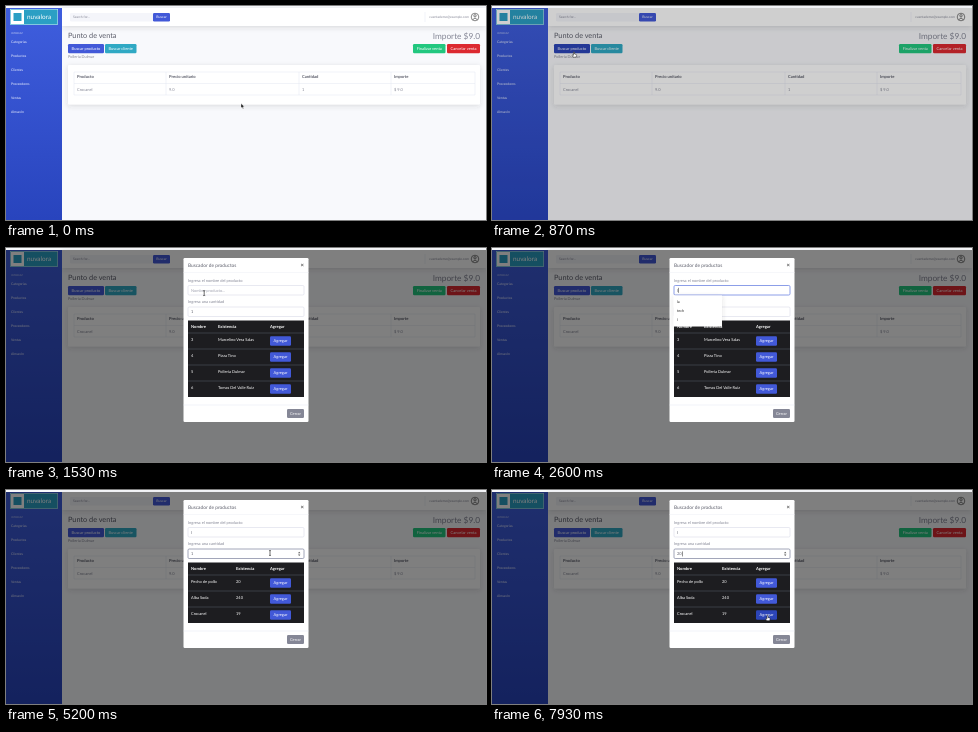
An HTML page that plays this animation: 480 by 214 pixels, repeating every 8 s.

```html
<!DOCTYPE html>
<html lang="es">
<head>
<meta charset="utf-8">
<title>Punto de venta</title>
<style>
  html, body { margin: 0; width: 100%; height: 100%; overflow: hidden; background: #f8f9fc; }
  svg { display: block; width: 100vw; height: 100vh; }
  text { font-family: Lato, "Open Sans", sans-serif; text-rendering: geometricPrecision; white-space: pre; }
</style>
</head>
<body>
<svg id="stage" viewBox="0 0 480 214">
  <defs>
    <linearGradient id="side" x2="0" y2="1">
      <stop stop-color="#3f5ede"/><stop offset="1" stop-color="#2844bd"/>
    </linearGradient>
    <filter id="soft" x="-10%" y="-30%" width="120%" height="170%">
      <feDropShadow dx="0" dy="1.5" stdDeviation="2.5" flood-color="#3a3b45" flood-opacity=".16"/>
    </filter>
  </defs>
</svg>
<script>
const LOOP = 8000;
const BLUE = '#4259d8', DARK_BLUE = '#2c45b8', GRAY = '#858796', INK = '#5a5c69', LINE = '#e3e6f0';
let parent = document.getElementById('stage');

function add(tag, attrs) {
  const el = document.createElementNS('http://www.w3.org/2000/svg', tag);
  for (const k in attrs) el.setAttribute(k, attrs[k]);
  return parent.appendChild(el);
}
function group(build, attrs) {
  const outer = parent, g = add('g', attrs);
  parent = g;
  build();
  parent = outer;
  return g;
}
const rect = (x, y, width, height, fill, more) => add('rect', { x, y, width, height, fill, ...more });
const line = (x1, y1, x2, y2, stroke, w = .5) => add('line', { x1, y1, x2, y2, stroke, 'stroke-width': w });
const path = (d, fill, stroke, w = .5) =>
  add('path', { d, fill, stroke, 'stroke-width': w, 'stroke-linejoin': 'round' });
function label(x, y, str, size, fill, more) {
  const el = add('text', { x, y, dy: '.33em', 'font-size': size, fill, ...more });
  el.textContent = str;
  return el;
}
const BOLD = { 'font-weight': 700 };
function button(x, y, w, h, str, fill, size = 4) {
  const box = rect(x, y, w, h, fill, { rx: 1.2 });
  label(x + w / 2, y + h / 2, str, size, '#fff', { 'text-anchor': 'middle' });
  return box;
}
const field = (y) => rect(182, y, 116, 9.5, '#fff', { rx: 1.2, stroke: '#d1d3e2', 'stroke-width': .5 });

// Page
rect(0, 0, 480, 214, '#f8f9fc');
rect(56, 2, 424, 18, '#fff', { filter: 'url(#soft)' });
rect(0, 2, 56, 212, 'url(#side)');
rect(4, 3, 48, 16, '#2b9fc4');
rect(5, 4, 13, 14, '#fff');
rect(7.5, 7, 8, 8, '#2b9fc4');
rect(4.3, 3.3, 47.4, 15.4, 'none', { stroke: '#bfe3f2', 'stroke-width': .6 });
label(21, 11, 'nuvalora', 6.4, '#fff');
label(5, 27, 'INTERFAZ', 2.5, '#a9b6ee', BOLD);
['Categorias', 'Productos', 'Clientes', 'Proveedores', 'Ventas', 'Almacén']
  .forEach((s, i) => label(5, 36.2 + i * 14, s, 3.4, '#f0f3ff'));

rect(64, 7, 83, 8.5, '#f4f5fa', { rx: 1.2 });
label(67, 11, 'Search for...', 3.3, GRAY);
button(147, 7, 17, 8.5, 'Buscar', BLUE, 3.5);
line(419, 6, 419, 16, LINE);
label(463, 11, 'cuentademo@example.com', 3.3, GRAY, { 'text-anchor': 'end' });
add('circle', { cx: 469, cy: 11, r: 3.8, fill: '#fff', stroke: '#333', 'stroke-width': .6 });
add('circle', { cx: 469, cy: 9.8, r: 1.2, fill: 'none', stroke: '#333', 'stroke-width': .6 });
path('M466.7 13.6Q469 10.6 471.3 13.6', 'none', '#333', .6);

label(62, 30, 'Punto de venta', 7.3, INK);
label(474, 30.5, 'Importe $9.0', 8.3, GRAY, { 'text-anchor': 'end' });
const searchBtn = button(62, 38, 36, 9.3, 'Buscar producto', BLUE);
button(99, 38, 31.5, 9.3, 'Buscar cliente', '#30a9c4');
button(407, 38, 32.5, 9.3, 'Finalizar venta', '#22c77f');
button(441, 38, 33, 9.3, 'Cancelar venta', '#dc2930');
label(62, 50.3, 'Pollería Dulmar', 3.9, GRAY);

rect(62, 59, 412, 39.5, '#fff', { rx: 1.2, filter: 'url(#soft)' });
[66, 77.5, 89].forEach(y => line(68, y, 469, y, LINE));
[68, 160, 293, 385, 469].forEach(x => line(x, 66, x, 89, LINE));
[['Producto', 'Crocanel', 71], ['Precio unitario', '9.0', 163], ['Cantidad', '1', 296], ['Importe', '$ 9.0', 388]]
  .forEach(([head, cell, x]) => {
    label(x, 70.8, head, 4.1, INK, BOLD);
    label(x, 83.2, cell, 4, GRAY);
  });

const backdrop = rect(0, 2, 480, 212, '#000');

// Dialog
function panel(rows, col) {
  const grow = 16 * rows.length;
  let last;
  const g = group(() => {
    rect(177.5, 10, 125, 100 + grow, '#fff', { rx: 1.2 });
    line(177.5, 24.5, 302.5, 24.5, '#eceef4');
    line(177.5, 93 + grow, 302.5, 93 + grow, LINE);
    button(281, 97 + grow, 17, 9, 'Cerrar', GRAY);
    rect(182, 72.5, 116, 12.5 + grow, '#1d1d20');
    [['Nombre', 185], ['Existencia', col], ['Agregar', 264]]
      .forEach(([s, x]) => label(x, 79, s, 4.1, '#fff', BOLD));
    rows.forEach(([a, b], i) => {
      const y = 85 + 16 * i;
      line(182, y, 298, y, '#50555c', .6);
      label(185, y + 6.5, a, 4, '#fff');
      label(col, y + 6.5, b, 4, '#fff');
      last = button(264, y + 3.3, 21, 9.4, 'Agregar', BLUE);
    });
  });
  return { g, last };
}
let clients, products, nameField, nameText, qtyField, qtyText, spinner, caret, menu;
const dialog = group(() => {
  clients = panel([['3', 'Marcelino Vera Salas'], ['4', 'Pizza Tino'], ['5', 'Pollería Dulmar'], ['6', 'Tomas Del Valle Ruiz']], 212);
  products = panel([['Pecho de pollo', '20'], ['Alba Soda', '240'], ['Crocanel', '19']], 230);
  label(182, 17, 'Buscador de productos', 4.8, INK);
  label(296.3, 16.8, '×', 6, '#555', { 'text-anchor': 'middle', ...BOLD });
  label(182, 32.3, 'Ingresa el nombre del producto', 4, GRAY);
  nameField = field(37.5);
  nameText = label(185, 42.3, '', 4, INK);
  label(182, 54, 'Ingresa una cantidad', 4, GRAY);
  qtyField = field(59);
  qtyText = label(185, 64, '', 4, INK);
  spinner = path('M292 63.2l1.2-1.5 1.2 1.5zM292 64.6l1.2 1.5 1.2-1.5z', '#555', 'none');
  caret = rect(0, 0, .5, 5, '#222');
  menu = group(() => {
    rect(181.5, 47.5, 48.5, 31, '#fff', { filter: 'url(#soft)' });
    ['la', 'tech', 'l'].forEach((s, i) => label(185, 54 + 9 * i, s, 3.7, '#222'));
  });
});

// Pointers, each with its hot spot at 0,0
const pointers = {
  arrow: group(() => path('M0 0V4.6L1.1 3.6 1.9 5.3 2.7 4.9 1.9 3.3H3.4Z', '#111', '#fff', .4)),
  hand: group(() => path('M-.5 0Q0-.6.5 0V2L2.3 2.5Q2.8 2.7 2.6 3.6L2.1 5.2H-.7L-2 3.2Q-1.6 2.5-.5 3.3Z', '#fff', '#111', .5)),
  beam: group(() => path('M-1-2.5Q0-2.5 0-2 0-2.5 1-2.5M0-2V2M-1 2.5Q0 2.5 0 2 0 2.5 1 2.5', 'none', '#111', .6))
};
const route = [
  [0, 235, 97.5], [70, 235, 97.5], [760, 82, 46], [930, 82, 46], [1070, 155, 65], [1670, 205, 42],
  [3070, 205, 42], [3870, 240, 104], [3930, 240, 104], [4130, 240.5, 106], [4200, 240.5, 106], [4730, 264, 63],
  [7470, 264, 63], [7900, 275.5, 125.5], [LOOP, 275.5, 125.5]
];

const clamp = v => Math.max(0, Math.min(1, v));
const ease = v => v * v * (3 - 2 * v);
const within = (t, a, b) => t >= a && t < b;
const show = (el, on) => el.setAttribute('visibility', on ? 'inherit' : 'hidden');
const set = (el, k, v) => el.setAttribute(k, v);

function pointerAt(t) {
  const i = route.findIndex(p => p[0] > t), [t0, x0, y0] = route[i - 1], [t1, x1, y1] = route[i];
  const k = ease((t - t0) / (t1 - t0));
  return [x0 + (x1 - x0) * k, y0 + (y1 - y0) * k];
}
function pointerKind(t, x, y) {
  if (within(t, 1870, 3070) || within(t, 5930, 7470)) return '';
  const overField = t > 1000 && x > 182 && x < 298 && (within(y, 37, 47) || within(y, 59, 69));
  if (overField) return 'beam';
  return within(t, 700, 960) || (t > 7470 && y > 119) ? 'hand' : 'arrow';
}

function draw(t) {
  set(backdrop, 'opacity', .5 * clamp((t - 815) / 150));
  const slide = clamp((t - 965) / 300);
  set(dialog, 'opacity', clamp((t - 955) / 150));
  set(dialog, 'transform', `translate(0 ${-13 * (1 - slide) ** 1.8})`);
  set(searchBtn, 'fill', within(t, 680, 1000) ? DARK_BLUE : BLUE);

  const listed = t >= 2870, typed = t >= 2400, onName = within(t, 1870, 4800), onQty = t >= 4800;
  show(clients.g, !listed);
  show(products.g, listed);
  set(products.last, 'fill', t >= 7800 ? DARK_BLUE : BLUE);
  show(menu, within(t, 2400, 4800));

  nameText.textContent = typed ? 'l' : 'Nombre producto...';
  set(nameText, 'fill', typed ? INK : '#a0a2b0');
  set(nameField, 'stroke', onName ? '#7f93e6' : '#d1d3e2');
  set(nameField, 'stroke-width', onName ? .9 : .5);
  const qty = t < 5930 ? '1' : t < 6200 ? '' : t < 6270 ? '2' : '20';
  qtyText.textContent = qty;
  set(qtyField, 'stroke', onQty ? '#8b90a8' : '#d1d3e2');
  set(qtyField, 'stroke-width', onQty ? .8 : .5);
  show(spinner, onQty);

  const blinkOff = within(t, 5200, 5730) || within(t, 6530, 7000) || within(t, 7470, 7930);
  show(caret, (onName || onQty) && !blinkOff);
  set(caret, 'x', onQty ? 185.2 + 2.4 * qty.length : typed ? 186.4 : 184.7);
  set(caret, 'y', onQty ? 61.4 : 39.8);

  const [x, y] = pointerAt(t), kind = pointerKind(t, x, y);
  for (const k in pointers) {
    show(pointers[k], k === kind);
    set(pointers[k], 'transform', `translate(${x} ${y})`);
  }
}

function tick() {
  draw(performance.now() % LOOP);
  requestAnimationFrame(tick);
}
tick();
</script>
</body>
</html>
```
